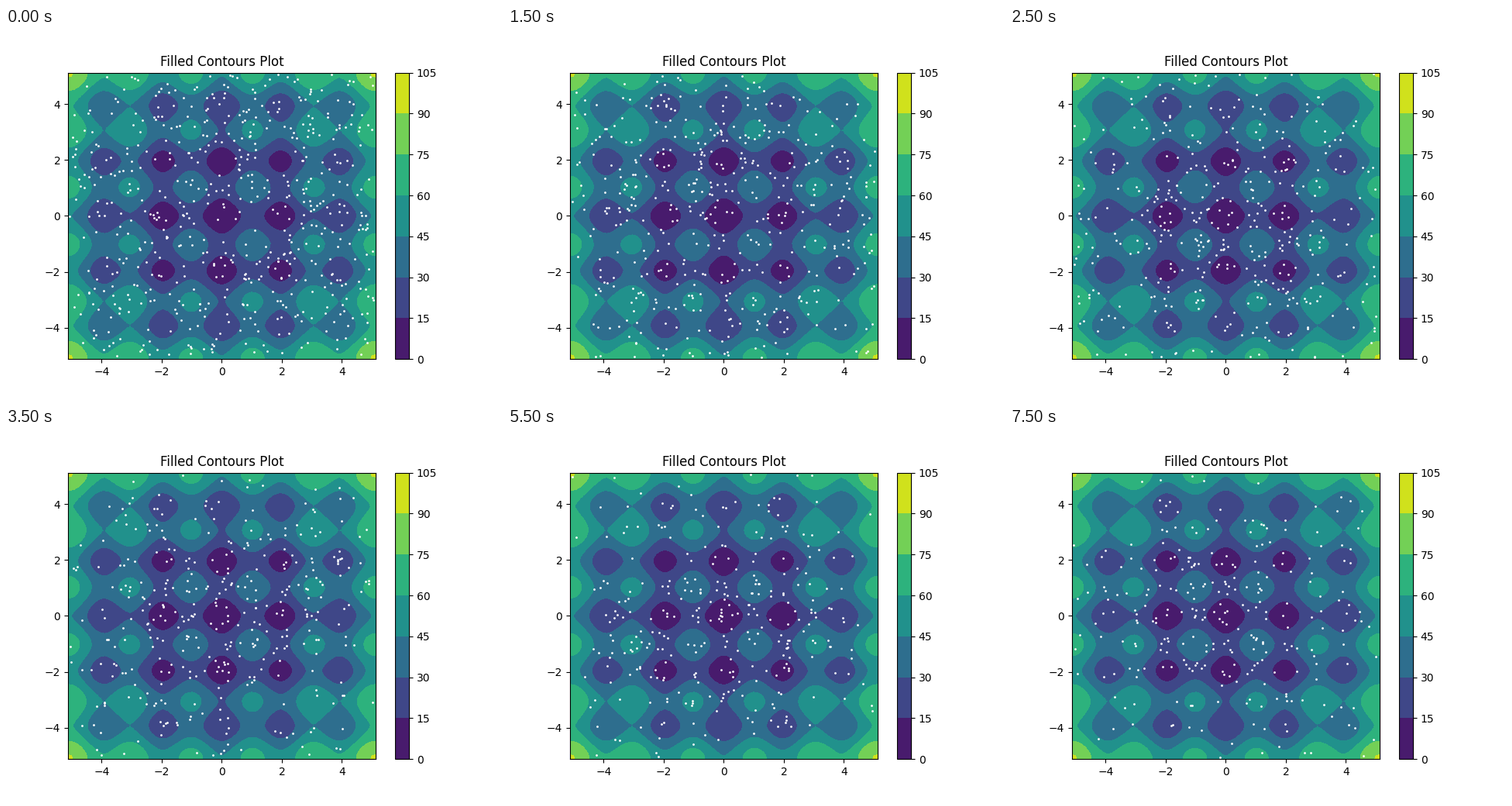
These frames come from a looping animation (640 px wide and 480 px high, 8 s). A matplotlib script:

```python
import numpy as np
import matplotlib.pyplot as plt
from matplotlib.animation import FuncAnimation

LIMIT = 5.12
FRAMES = 16
INTERVAL = 500


def rastrigin(x, freq):
    """One-dimensional Rastrigin term."""
    return 10 + x**2 - 10 * np.cos(freq * np.pi * x)


def sample_axis(rng, count, beta):
    """Draw coordinates with Boltzmann weights, favouring the minima."""
    grid = np.linspace(-LIMIT + 0.05, LIMIT - 0.05, 2001)
    weight = np.exp(-beta * rastrigin(grid, 2))
    return rng.choice(grid, count, p=weight / weight.sum())


def population(step):
    """The population shrinks and gathers around the minima."""
    rng = np.random.default_rng(100 + step)
    count = int(235 + 335 * np.exp(-step / 7))
    beta = 0.004 + 0.055 * (1 - np.exp(-step / 4))
    return sample_axis(rng, count, beta), sample_axis(rng, count, beta)


fig, ax = plt.subplots(figsize=(6.4, 4.8), dpi=100)
axis = np.linspace(-LIMIT, LIMIT, 100)
x, y = np.meshgrid(axis, axis)
contours = ax.contourf(x, y, rastrigin(x, 1) + rastrigin(y, 1),
                       levels=np.arange(0, 106, 15))
fig.colorbar(contours)
ax.set_title("Filled Contours Plot")
ax.set_xlim(-LIMIT, LIMIT)
ax.set_ylim(-LIMIT, LIMIT)
dots, = ax.plot([], [], "o", color="white", markersize=1, markeredgewidth=1)


def update(step):
    dots.set_data(*population(step))
    return dots,


anim = FuncAnimation(fig, update, frames=FRAMES, interval=INTERVAL,
                     repeat=True, repeat_delay=0)
plt.show()
```
